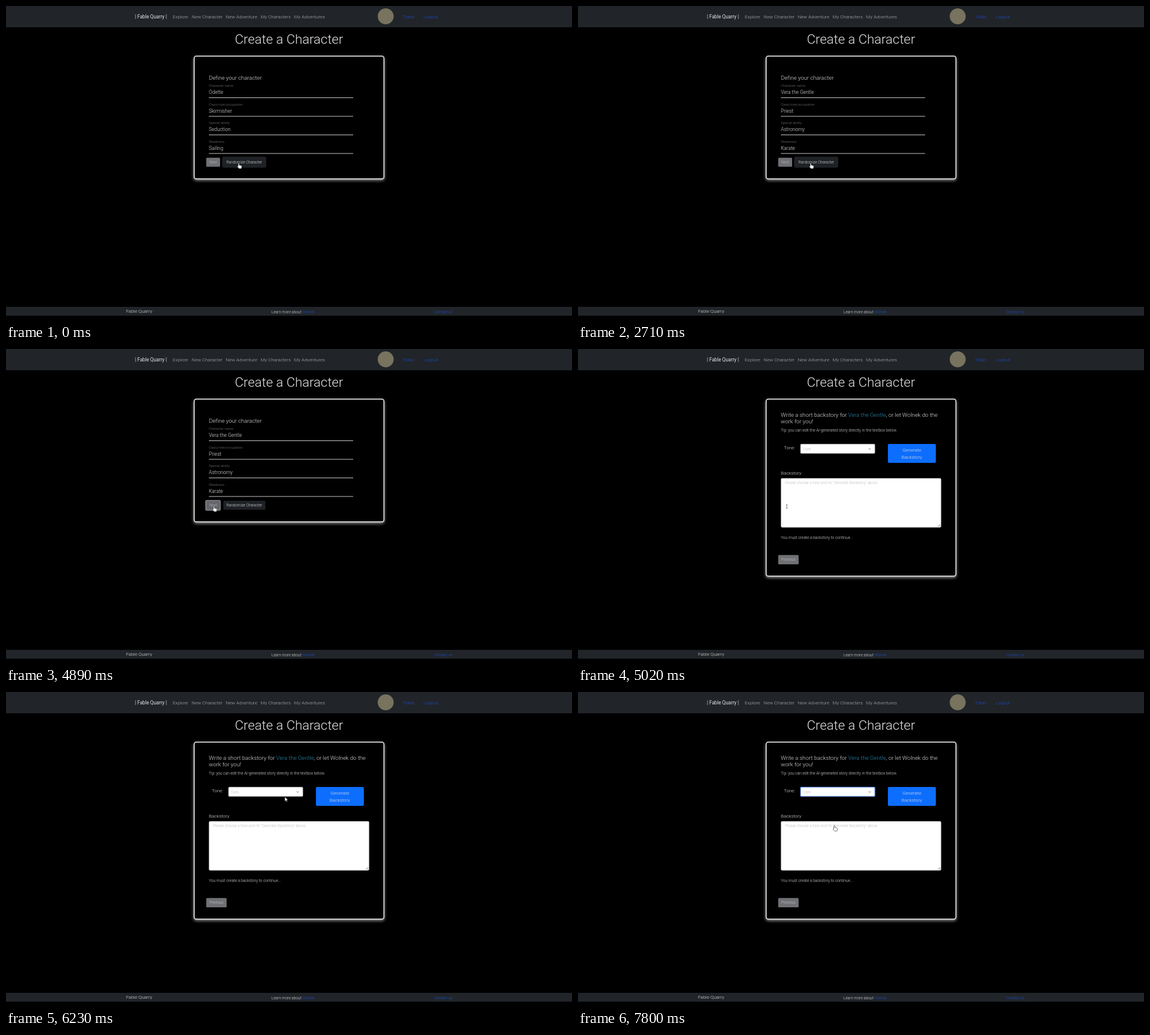
Recreate the animation shown at these times as an HTML page. Size 957 px wide and 534 px high, loop 8000 ms.

```html
<!DOCTYPE html>
<html lang="en">
<head>
<meta charset="utf-8">
<title>Create a Character</title>
<style>
html, body { margin: 0; width: 957px; height: 534px; overflow: hidden; background: #000 }
svg { display: block; font: 300 8px Roboto, sans-serif; fill: #e4e4e4 }
.title { font-size: 22.4px }
.head { font-size: 9.6px }
.value { font-size: 8.4px }
.small { font-size: 6.65px }
.btn { font-size: 6.4px }
.label { font-size: 5.9px; fill: #777 }
.nav { fill: #b4b6b8 }
.link { fill: #1d4fd0 }
.name { fill: #2c8fb0 }
.mid { text-anchor: middle }
.faint { fill: #b8b8b8; font-size: 6.3px }
.bar { fill: #212529 }
.gray { fill: #707175 }
.card { fill: #000; stroke: #f4f4f4; stroke-width: 1.5; filter: drop-shadow(0 2px 2.5px #999) }
.line { stroke: #c8c8c8; stroke-width: 1.1 }
.cursor { fill: #fff; stroke: #222; stroke-width: .6 }
</style>
</head>
<body>
<svg width="957" height="534" viewBox="0 0 957 534">
  <rect class="bar" width="957" height="36"/>
  <text x="218" y="20.5" font-size="8.2" font-weight="400">| Fable Quarry |</text>
  <g class="nav">
    <text x="282" y="20.5">Explore</text>
    <text x="314" y="20.5">New Character</text>
    <text x="371.5" y="20.5">New Adventure</text>
    <text x="430.5" y="20.5">My Characters</text>
    <text x="487" y="20.5">My Adventures</text>
  </g>
  <circle cx="642" cy="17.5" r="13.5" fill="#77735f"/>
  <g class="link">
    <text x="671" y="20.5">Tobin</text>
    <text x="706" y="20.5">Logout</text>
  </g>
  <text class="title mid" x="478.5" y="64.3">Create a Character</text>

  <rect class="bar" y="510" width="957" height="15"/>
  <text x="203" y="520">Fable Quarry</text>
  <g font-size="6.5">
    <text x="449" y="520.8">Learn more about</text>
    <text class="link" x="501" y="520.8">Wolnek</text>
    <text class="link" x="724" y="520.8">Contact us</text>
  </g>

  <rect class="card" id="card" x="318.2" y="85" width="320.8" height="208" rx="3.5"/>

  <g id="define">
    <text class="head" x="343" y="124.5">Define your character</text>
    <g id="fields"></g>
    <rect id="nextRing" x="337" y="256" width="26" height="18" rx="2.5" fill="#85868c"/>
    <rect class="gray" id="next" x="338.5" y="257.3" width="23.5" height="15.2" rx="1.5"/>
    <text class="btn mid" x="350.2" y="267" fill="#b9b9bc">Next</text>
    <rect id="randomRing" x="365.5" y="255.5" width="74.5" height="18.5" rx="3" fill="#202224"/>
    <rect x="367.5" y="257.3" width="71" height="15.2" rx="1.5" fill="#1e2125"/>
    <text class="btn mid" x="403" y="267">Randomize Character</text>
  </g>

  <g id="story">
    <text class="head" x="343" y="114.5">Write a short backstory for <tspan class="name">Vera the Gentle</tspan>, or let Wolnek do the</text>
    <text class="head" x="343" y="126.2">work for you!</text>
    <text class="small" x="343" y="140.2">Tip: you can edit the AI-generated story directly in the textbox below.</text>
    <text x="348" y="170.3">Tone:</text>
    <rect id="select" x="376.3" y="161.3" width="125.6" height="15.6" rx="1.5" fill="#fff" stroke="#ccc" stroke-width=".7"/>
    <text class="faint" x="381" y="171.5">Dark</text>
    <path d="M491.3 168.5l1.9 1.8 1.9-1.8" fill="none" stroke="#555" stroke-width=".8"/>
    <rect x="524" y="161" width="81" height="32" rx="2" fill="#0d6efd"/>
    <text class="mid" x="564.5" y="174">Generate</text>
    <text class="mid" x="564.5" y="186.2">Backstory</text>
    <text x="343" y="213">Backstory</text>
    <rect x="343.3" y="219.3" width="270.5" height="83" rx="2" fill="#fff" stroke="#ccc" stroke-width=".6"/>
    <text class="faint" x="350" y="228.8">Please choose a tone and hit "Generate Backstory" above.</text>
    <path d="M608.5 301l4-4m-1.6 4l1.6-1.6" stroke="#555" stroke-width=".7"/>
    <text class="small" x="343" y="322">You must create a backstory to continue...</text>
    <rect class="gray" x="338.5" y="349.3" width="34.5" height="15.7" rx="1.5"/>
    <text class="btn mid" x="355.8" y="359.4" fill="#c4c4c6">Previous</text>
  </g>

  <g class="cursor" id="cursor">
    <path id="hand" d="M-2.5-4.3q.9-.9 1.7 0v3l3.7.8q1 .4.8 1.6l-.8 3.7h-3.9l-2.8-3.3q.2-1.3 1.3-.7z"/>
    <path id="arrow" d="M-1.6-4.2v7.6l1.8-1.6 1.2 2.6 1.2-.6-1.2-2.5h2.4z"/>
    <path id="beam" fill="none" d="M-1.3-3h2.6m-1.3 0v6m-1.3 0h2.6"/>
  </g>
</svg>
<script>
const $ = id => document.getElementById(id);
const show = (id, on) => { $(id).style.display = on ? '' : 'none'; };

const LOOP = 8000, RANDOMIZE = 1720, HOVER_NEXT = 4100, CLICK = 4890, STORY = 5020, SELECT = 6490;
const fields = [
  ['Character name', 'Odette', 'Vera the Gentle'],
  ['Class/role/occupation', 'Skirmisher', 'Priest'],
  ['Special ability', 'Seduction', 'Astronomy'],
  ['Weakness', 'Sailing', 'Karate']
];
$('fields').innerHTML = fields.map(([label], i) => {
  const y = 31.5 * i;
  return `<text class="label" x="343" y="${137 + y}">${label}</text>
    <text class="value" x="343" y="${149 + y}"></text>
    <path class="line" d="M343 ${155.5 + y}h244"/>`;
}).join('');
const values = document.querySelectorAll('.value');

// Cursor stops: time, x, y. It jumps between stops on the first page and glides on the second.
const stops = [
  [0, 395, 271], [3700, 393, 271], [3900, 369, 270], [4100, 356, 270], [4300, 353, 271],
  [STORY, 353, 267], [5640, 354, 267], [5900, 395, 239], [6230, 473, 182], [SELECT, 477, 171],
  [6620, 474, 173], [7270, 439, 227], [7600, 438, 228], [7730, 438, 228], [7800, 435, 231], [LOOP, 435, 231]
];

function cursorAt(t) {
  const i = stops.findIndex(s => s[0] > t);
  const [t0, x0, y0] = stops[i - 1], [t1, x1, y1] = stops[i];
  const k = t < STORY ? 0 : (t - t0) / (t1 - t0);
  return [x0 + (x1 - x0) * k, y0 + (y1 - y0) * k];
}

function draw(now) {
  const t = now % LOOP, story = t >= STORY;
  show('define', !story);
  show('story', story);
  $('card').setAttribute('height', story ? 300 : 208);
  values.forEach((v, i) => { v.textContent = fields[i][t < RANDOMIZE ? 1 : 2]; });

  show('randomRing', t < CLICK);
  show('nextRing', t >= CLICK);
  $('next').style.fill = t < HOVER_NEXT ? '' : '#65666d';
  $('select').style.stroke = t < SELECT ? '' : '#6f9cf0';
  $('select').style.strokeWidth = t < SELECT ? '' : 1.3;

  const [x, y] = cursorAt(t);
  const kind = !story || t > 6750 ? 'hand' : y > 219 && t < SELECT ? 'beam' : 'arrow';
  for (const id of ['hand', 'arrow', 'beam']) show(id, id === kind);
  $('cursor').setAttribute('transform', `translate(${x} ${y})`);
  requestAnimationFrame(draw);
}
requestAnimationFrame(draw);
</script>
</body>
</html>
```
